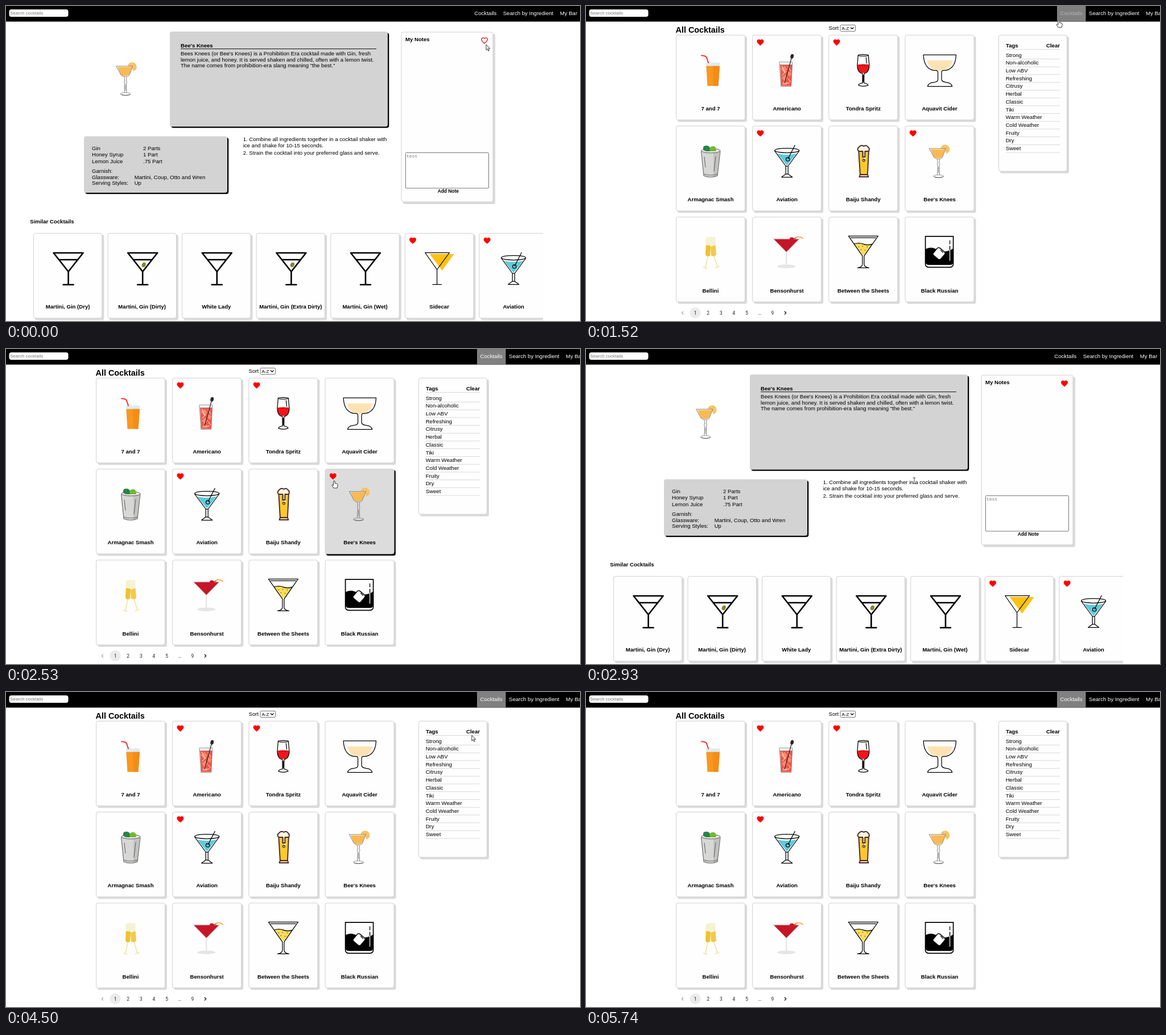
These frames come from a looping animation (1009x555 px, 5970 ms). An HTML page:

```html
<!DOCTYPE html>
<html lang="en">
<head>
<meta charset="utf-8">
<title>Cocktail browser</title>
<style>
html, body { margin: 0; width: 100%; height: 100%; overflow: hidden; background: #fff; }
svg { display: block; width: 1009px; height: 555px; font: 9.6px "Liberation Sans", Arial, sans-serif; }
.bold { font-weight: bold; }
.small { font-size: 8px; }
.mono { font: 8px "Liberation Mono", monospace; }
.page-number { font: 8.4px Roboto, sans-serif; fill: #222; }
.face { fill: #fefefe; stroke: #d0d0d0; }
.shadow { fill: #dadada; }
.hot .face { fill: #dcdcdc; }
.hot .shadow { fill: #000; transform: translate(-.7px, -.5px); }
.ink { fill: none; stroke: #000; stroke-width: 1.25; stroke-linecap: round; stroke-linejoin: round; }
.thick { stroke-width: 2.6; }
.hidden { display: none; }
</style>
</head>
<body>
<svg id="stage" viewBox="0 0 1009 555"></svg>
<script>
const LOOP = 5970;
const stage = document.getElementById('stage');

const text = (x, y, str, cls = '', attrs = '') => `<text x="${x}" y="${y}" class="${cls}" ${attrs}>${str}</text>`;
const centered = (x, y, str, cls = '', attrs = '') => text(x, y, str, cls, `text-anchor="middle" ${attrs}`);
const rect = (x, y, w, h, attrs = '') => `<rect x="${x}" y="${y}" width="${w}" height="${h}" ${attrs}/>`;
const path = (d, attrs = 'class="ink"') => `<path d="${d}" ${attrs}/>`;
const fill = (d, color) => path(d, `fill="${color}"`);
const line = (d, color, width = 1) => path(d, `fill="none" stroke="${color}" stroke-width="${width}" stroke-linecap="round"`);
const ellipse = (x, y, rx, ry, attrs) => `<ellipse cx="${x}" cy="${y}" rx="${rx}" ry="${ry}" ${attrs}/>`;
const group = (x, y, body, attrs = '') => `<g transform="translate(${x} ${y})" ${attrs}>${body}</g>`;

const heartShape = 'M12 21.35l-1.45-1.32C5.4 15.36 2 12.28 2 8.5 2 5.42 4.42 3 7.5 3c1.74 0 3.41.81 4.5 2.09C13.09 3.81 14.76 3 16.5 3 19.58 3 22 5.42 22 8.5c0 3.78-3.4 6.86-8.55 11.54z';
const heart = (x, y, attrs = '') =>
  `<g ${attrs}><path transform="translate(${x - 7.2} ${y - 7.3}) scale(.6)" d="${heartShape}" fill="#f00"/></g>`;
const hollowHeart = (x, y, attrs) =>
  `<g ${attrs}><path transform="translate(${x - 6.5} ${y - 6.6}) scale(.54)" d="${heartShape}" fill="none" stroke="#e01010" stroke-width="2.3"/></g>`;

const martini = path('M-25 -28H27L1 5ZM-15.5 -16H17.5M1 5V28M-8 28H10', 'class="ink thick"');
const olive = ellipse(3, -7, 3.4, 4.3, 'fill="#85842f" transform="rotate(25 3 -7)"');

// Each drink is drawn around the centre of its picture.
const drinks = {
  martini,
  dirty: martini + olive,
  sidecar: fill('M-17 -26H26L5 3Z', '#ffc112') + path('M-25 -28.5H18L-4 1.5ZM-4 1.5V27.5M-11.5 27.5H4'),
  aviation: fill('M-17 -14Q0 -10 17 -14L1 6H-1Z', '#5fcbdc') +
    ellipse(0, -19.5, 21.5, 4, 'class="ink"') +
    path('M-21.5 -18.5L-2 8V22M21.5 -18.5L2 8V22M-2 8H2M-2 22L-9.5 27.5H9.5L2 22ZM2 -5L14 -28.5') +
    ellipse(1.5, -4, 3.2, 3.2, 'class="ink"'),
  bees: fill('M1.8 -23.5A8 8 0 1 1 12 -14L9.5 -21.5Z', '#fcc05f') + line('M4 -24L9.5 -21.5L9 -28M9.5 -21.5L16 -23', '#ffe0a5', .7) +
    fill('M-16 -21.5H10L4.5 -8Q-3 -3 -10 -8Z', '#fdb951') +
    line('M-18 -23H11L4.5 -7Q-2 -1 -9.5 -7ZM-4 -3L-3.2 3Q-6 5 -3.2 7L-4 23M0 -3L-.6 3Q2 5 -.6 7L0 23M-2 10V20', '#777', .9) +
    ellipse(-2, 26, 9, 2.4, 'fill="none" stroke="#777" stroke-width=".8"') + line('M-9 27Q-2 30 6 27', '#555'),
  highball: fill('M-8 -14H16.5L13.5 27H-5.5Z', '#dcebf0') + fill('M-7.6 -8H16L13.5 27H-5.5Z', '#f9981d') +
    fill('M4 -8H16L13.5 27H5Z', '#f58c18') + line('M-16 -26.5Q-8 -26 -7 -23L-4 -14', '#ee3124', 2),
  americano: fill('M-12 -10H9.5L7.5 27H-10Z', '#ef544b') +
    fill('M-11 -3L-4 -8L1 -2L-5 4ZM-9 12L-3 7L2 13L-5 19ZM2 1L8 4L6 11L1 8ZM-8 21L-2 19L1 25H-8Z', '#f98b6e') +
    line('M-9 -8L-4 3M2 -7L7 1M-8 8L-2 2M3 15L6 20M-5 23L4 22', '#ffd4b8', 1.2) +
    line('M-13 -15H9.5L7.5 28H-10ZM-13 -10H9', '#777', .8) + line('M-4 22L8 -22', '#332222', 1.3) +
    ellipse(9, -25, 2.8, 4, 'fill="#29232b" transform="rotate(15 9 -25)"'),
  spritz: fill('M-10 -10H10Q10 3 2 4H-2Q-10 3 -10 -10Z', '#f5141a') + ellipse(0, -9.5, 10, 1.6, 'fill="#d90f15"') +
    ellipse(0, -27, 9, 1.4, 'class="ink"') +
    path('M-9 -27L-10.5 -9Q-10 4 -1.5 5L-1.2 22Q-8 23 -8.5 26Q0 29.5 8.5 26Q8 23 1.2 22L1.5 5Q10 4 10.5 -9L9 -27M5 -23L6 -13M0 8V20'),
  coupe: fill('M-22 -18H23Q18 0 2 0H-3Q-18 -1 -22 -18Z', '#ffe2b4') +
    path('M-28.5 -27.5H29C28 -8 19 0 6 0Q3.5 0 3.5 4V16Q4 20 12 21Q21 22 22 28H-21Q-20 22 -11 21Q-3 20 -3 16V4Q-3 0 -6 0C-19 0 -27.5 -8 -28.5 -27.5Z'),
  julep: fill('M-16.5 -19Q0 -25 17 -19L12 25Q0 29 -12 25Z', '#d7d7d5') + fill('M5 -18L16 -19L12 25L5 27Z', '#c3c3c2') +
    ellipse(.5, -19, 16.5, 3.8, 'fill="#eee" stroke="#555"') +
    fill('M-1 -18Q-17 -17 -12 -27Q0 -31 0 -18Z', '#258448') + fill('M-1 -18Q-4 -27 6 -27Q12 -23 9 -18Z', '#74b82c') +
    line('M-16.5 -18L-12 25Q0 30 12 25L17 -18M-12 22Q0 26 12 22M-11 -8L-9 10M9 -9L6 17', '#666', 1.1),
  beer: fill('M-8.5 -17H9L7 25H-5.5Z', '#fec82c') + fill('M-9 -27H9V-17H4V-4H1V-17H-9Z', '#fff6df') +
    path('M-8 -18L-5.5 23L-7 27H9L7.5 23L9.5 -18Q12 -23 8 -26Q5 -30 1 -27Q-4 -30 -7 -26Q-12 -22 -8 -18ZM-8 -18H-1V-8H3V-18H9M-5.5 23H7.5', 'fill="none" stroke="#45292b" stroke-width="1.9" stroke-linejoin="round"') +
    ellipse(1, -2, 2, 2, 'fill="none" stroke="#45292b" stroke-width="1.3"'),
  bellini: fill('M-8.5 -26L2 -28L1 6Q-7 9 -9 3Z', '#f5f2cf') + fill('M-1 -26L8 -28L10 4Q6 9 0 5Z', '#f4f3d8') +
    fill('M-8 -13L0 -12L-1 5Q-7 10 -9 3Z', '#efc232') + fill('M0 -10L8.5 -13L10 4Q6 9 1 5Z', '#f3c94b') +
    line('M-5 7L-9 26M-13 26L-6 28M6 7L12 25M8 27L15 25', '#eadb7a', 1.1),
  bensonhurst: fill('M-26 -25H24L-1 1Z', '#ececec') + fill('M-23 -23.5H21L-1 -1Z', '#c51628') + line('M-25 -24.5H23', '#ddd', 1) +
    line('M-1 0V23', '#dedede', 1.8) + ellipse(-1, 24.5, 16, 3.2, 'fill="#e5e5e5"') +
    line('M12 -24Q20 -31 28 -25', '#f6a02b', 1.6) + ellipse(8.5, -23, 4, 3.8, 'fill="#d4142b"') + line('M9 -24L16 -25', '#7d1520', .8),
  sheets: fill('M-16 -15Q-8 -18 0 -15T16 -15L1.5 4H-1.5Z', '#fcdc59') +
    path('M-26 -29H26L1.5 6V21Q2 26 10 27H-10Q-2 26 -1.5 21V6ZM-22 -26H22M-16 -15Q-8 -18 0 -15T16 -15') +
    path('M-8 -10h.1M-1 -11h.1M7 -10h.1M-4 -5h.1M3 -4h.1'),
  russian: fill('M-25 -6Q-14 -12 -3 -4Q10 2 24 -7V16Q24 22 18 22H-18Q-25 22 -25 16Z', '#000') +
    path('M-25 -28.5H24V20Q24 26 18 26H-19Q-25 26 -25 20Z', 'class="ink" style="stroke-width:1.7"') +
    rect(-8.5, -8.5, 17, 17, 'rx="3.5" fill="#fff" stroke="#000" stroke-width="1.5" transform="translate(-1 2) rotate(40)"') +
    path('M2 -4L6 0M18 -21V-15') + line('M18 -11V14', '#fff', 1.2) + line('M18 -11V-5', '#000', 1.4),
};

const panel = (x, y, w, h, depth = 3) =>
  rect(x + depth, y + depth, w, h, 'rx="3.5" class="shadow"') + rect(x + .5, y + .5, w - 1, h - 1, 'rx="3.5" class="face"');
const grayBox = (x, y, w, h) => rect(x + 2.3, y + 2.3, w, h, 'rx="4"') + rect(x, y, w, h, 'rx="4" fill="#d3d3d3"');

function card(center, y, width, name, drink, heartAttrs) {
  const x = center - width / 2;
  const badge = heartAttrs === undefined ? '' : heart(x + 14.2, y + 13.6, heartAttrs);
  return `<g data-box="${x},${y},${width},150.5">${panel(x, y, width, 150.5)}` +
    group(center, y + 63, drinks[drink]) + centered(center, y + 133.3, name, 'bold') + badge + '</g>';
}

const header = rect(0, 0, 1009, 27.5) + rect(5.5, 6, 104, 13, 'rx="4" fill="#fff"') +
  text(7, 15.3, 'Search cocktails', 'small', 'fill="#757575"');
const nav = x => text(x, 15.8, 'Cocktails', 'link', 'fill="#fff"') +
  text(x + 50.4, 15.8, 'Search by Ingredient', '', 'fill="#fff"') + text(x + 150.4, 15.8, 'My Bar', '', 'fill="#fff"');

function detailPage() {
  const lines = [
    [307, 87, 'Bees Knees (or Bee\'s Knees) is a Prohibition Era cocktail made with Gin, fresh'],
    [307, 97.8, 'lemon juice, and honey. It is served shaken and chilled, often with a lemon twist.'],
    [307, 108.4, 'The name comes from prohibition-era slang meaning "the best."'],
    [151, 253.5, 'Gin'], [241, 253.5, '2 Parts'],
    [151, 265.3, 'Honey Syrup'], [241, 265.3, '1 Part'],
    [151, 277.2, 'Lemon Juice'], [241, 277.2, '.75 Part'],
    [151, 293.7, 'Garnish:'],
    [151, 304.6, 'Glassware:'], [225.7, 304.6, 'Martini, Coup, Otto and Wren'],
    [151, 315.4, 'Serving Styles:'], [225.7, 315.4, 'Up'],
    [416.7, 238, '1. Combine all ingredients together in a cocktail shaker with'],
    [416.7, 248.6, 'ice and shake for 10-15 seconds.'],
    [416.7, 262.3, '2. Strain the cocktail into your preferred glass and serve.'],
  ];
  const similar = [
    ['Martini, Gin (Dry)', 'martini'], ['Martini, Gin (Dirty)', 'dirty'], ['White Lady', 'martini'],
    ['Martini, Gin (Extra Dirty)', 'dirty'], ['Martini, Gin (Wet)', 'martini'],
    ['Sidecar', 'sidecar', ''], ['Aviation', 'aviation', ''],
  ];
  return nav(823.3) + group(212, 129, drinks.bees) +
    grayBox(288, 45, 383, 167.5) + grayBox(137, 229.5, 252, 99.5) +
    text(307, 72.8, 'Bee\'s Knees', 'bold') + rect(307, 75, 344, .9) +
    lines.map(l => text(...l)).join('') +
    panel(694.5, 45.5, 162, 300, 3.5) + text(702, 62, 'My Notes', 'bold') +
    heart(841, 61, 'id="saved"') + hollowHeart(841, 61, 'id="unsaved"') +
    rect(702.5, 258.5, 146, 62.5, 'rx="1" fill="#fff" stroke="#767676"') + text(704, 267, 'test', 'mono', 'fill="#757575"') +
    centered(777.3, 329, 'Add Note', 'bold', 'style="font-size:8.4px"') +
    text(42.3, 383.2, 'Similar Cocktails', 'bold') +
    `<g clip-path="url(#strip)">${similar.map(([name, drink, saved], i) => card(108.6 + 130.6 * i, 400, 121.5, name, drink, saved)).join('')}</g>`;
}

function listPage() {
  const cocktails = [
    ['7 and 7', 'highball'], ['Americano', 'americano', ''], ['Tondra Spritz', 'spritz', ''], ['Aquavit Cider', 'coupe'],
    ['Armagnac Smash', 'julep'], ['Aviation', 'aviation', ''], ['Baiju Shandy', 'beer'], ['Bee\'s Knees', 'bees', 'id="favorite"'],
    ['Bellini', 'bellini'], ['Bensonhurst', 'bensonhurst'], ['Between the Sheets', 'sheets'], ['Black Russian', 'russian'],
  ];
  const tags = ['Strong', 'Non-alcoholic', 'Low ABV', 'Refreshing', 'Citrusy', 'Herbal', 'Classic', 'Tiki',
    'Warm Weather', 'Cold Weather', 'Fruity', 'Dry', 'Sweet'];
  const rule = y => rect(738, y, 95, .8, 'fill="#d0d0d0"');
  const pages = ['1', '2', '3', '4', '5', '…', '9'];
  return rect(828, 0, 50.5, 27.5, 'fill="#808080"') + nav(833.6) +
    text(157.5, 46.8, 'All Cocktails', 'bold', 'style="font-size:14.4px"') + text(426.5, 41.7, 'Sort') +
    rect(447, 33.5, 26.5, 11, 'rx="1.5" fill="#fff" stroke="#767676"') + text(449.5, 42, 'A-Z', 'small') +
    path('M465.5 38l2.3 2.4l2.3 -2.4') +
    cocktails.map(([name, drink, saved], i) =>
      card(219 + 134.2 * (i % 4), 50.7 + 160.3 * Math.floor(i / 4), 122, name, drink, saved)).join('') +
    panel(725, 50.7, 121, 241) + text(738, 72.8, 'Tags', 'bold') + text(833, 72.8, 'Clear', 'bold', 'text-anchor="end"') + rule(76) +
    tags.map((tag, i) => text(737.7, 89.5 + 13.72 * i, tag) + rule(93 + 13.72 * i)).join('') +
    ellipse(192, 540.5, 9.6, 9.6, 'fill="#ebebeb"') +
    pages.map((p, i) => centered(192 + 22.65 * i, 543.6, p, 'page-number')).join('') +
    line('M170.7 538.3l-2.3 2.4l2.3 2.4', '#999', 1.1) + line('M349.3 538.3l2.3 2.4l-2.3 2.4', '#111', 1.3);
}

const cursorStyle = 'fill="#fff" stroke="#222" stroke-width=".9" stroke-linejoin="round"';
const cursors = {
  arrow: path('M0 0V9.6L2.2 7.6L3.8 11.2L5.3 10.5L3.8 7H6.8Z', cursorStyle),
  hand: path('M-1.2 1Q0 -1 1.2 1V4.6L4.8 5.4Q6.4 5.9 6.2 7.6L5 13H-1L-4 8.6Q-4.3 6.8 -2.6 7.2L-1.2 8.4Z', cursorStyle),
  beam: line('M-2 -5H2M0 -5V5M-2 5H2', '#333', .9),
};

stage.innerHTML = `<defs><clipPath id="strip">${rect(42, 390, 902, 165)}</clipPath></defs>` + header +
  `<g id="detail">${detailPage()}</g><g id="list">${listPage()}</g>` +
  `<g id="pointer"><circle id="click" r="7.3" fill="#ff0" fill-opacity=".5"/>` +
  Object.entries(cursors).map(([kind, shape]) => `<g id="${kind}">${shape}</g>`).join('') + '</g>';

// Pointer moves: first step time, last step time, step count, end point.
const moves = [
  [50, 130, 2, 838, 62], [680, 990, 5, 839.5, 17], [1520, 2070, 8, 644, 199.5], [2150, 2530, 6, 577, 232],
  [3080, 3640, 8, 852, 58], [3790, 3870, 2, 842, 61], [4500, 4810, 5, 619, 208], [4890, 4960, 2, 570, 234],
  [5190, 5190, 1, 566, 231], [5590, 5670, 2, 934, 340],
];
const clicks = [[280, 450], [1220, 1370], [4100, 4180]];
const within = (v, from, to) => v >= from && v < to;

function pointerAt(t) {
  let x = 844, y = 68;
  for (const [start, end, steps, toX, toY] of moves) {
    if (t < start) break;
    const gap = (end - start) / (steps - 1 || 1);
    const u = Math.min(1, (Math.floor((t - start) / (gap || 1) + .01) + 1) / steps);
    const eased = u * u * (3 - 2 * u);
    x += (toX - x) * eased;
    y += (toY - y) * eased;
  }
  return [x, y];
}

const byId = id => document.getElementById(id);
const show = (id, on) => byId(id).classList.toggle('hidden', !on);
const cards = [...document.querySelectorAll('#list [data-box]')].map(el => ({ el, box: el.dataset.box.split(',').map(Number) }));
const links = document.querySelectorAll('.link');

function render(t) {
  const onList = within(t, 1290, 2930) || t >= 4500;
  const [x, y] = pointerAt(t);
  const visible = t < 5740;
  const onLink = visible && y < 27 && within(x, 823, 873);
  let onCard = false;
  for (const { el, box: [left, top, w, h] } of cards) {
    const hot = visible && onList && within(x, left, left + w) && within(y, top, top + h);
    el.classList.toggle('hot', hot);
    onCard = onCard || hot;
  }
  const onText = !onList && (within(x, 417, 668) && within(y, 229, 264) || within(x, 307, 651) && within(y, 64, 110));
  const kind = onLink || onCard ? 'hand' : onText ? 'beam' : 'arrow';

  show('detail', !onList);
  show('list', onList);
  show('saved', within(t, 450, 4180));
  show('unsaved', !within(t, 450, 4180));
  show('favorite', t < 4180);
  show('pointer', visible);
  show('click', clicks.some(([from, to]) => within(t, from, to)));
  for (const k in cursors) show(k, k === kind);
  for (const link of links) link.setAttribute('fill', onLink ? '#b4b4b4' : '#fff');
  byId('pointer').setAttribute('transform', `translate(${x.toFixed(2)} ${y.toFixed(2)})`);
}

const began = performance.now();
function tick() {
  render((performance.now() - began) % LOOP);
  requestAnimationFrame(tick);
}
tick();
</script>
</body>
</html>
```
